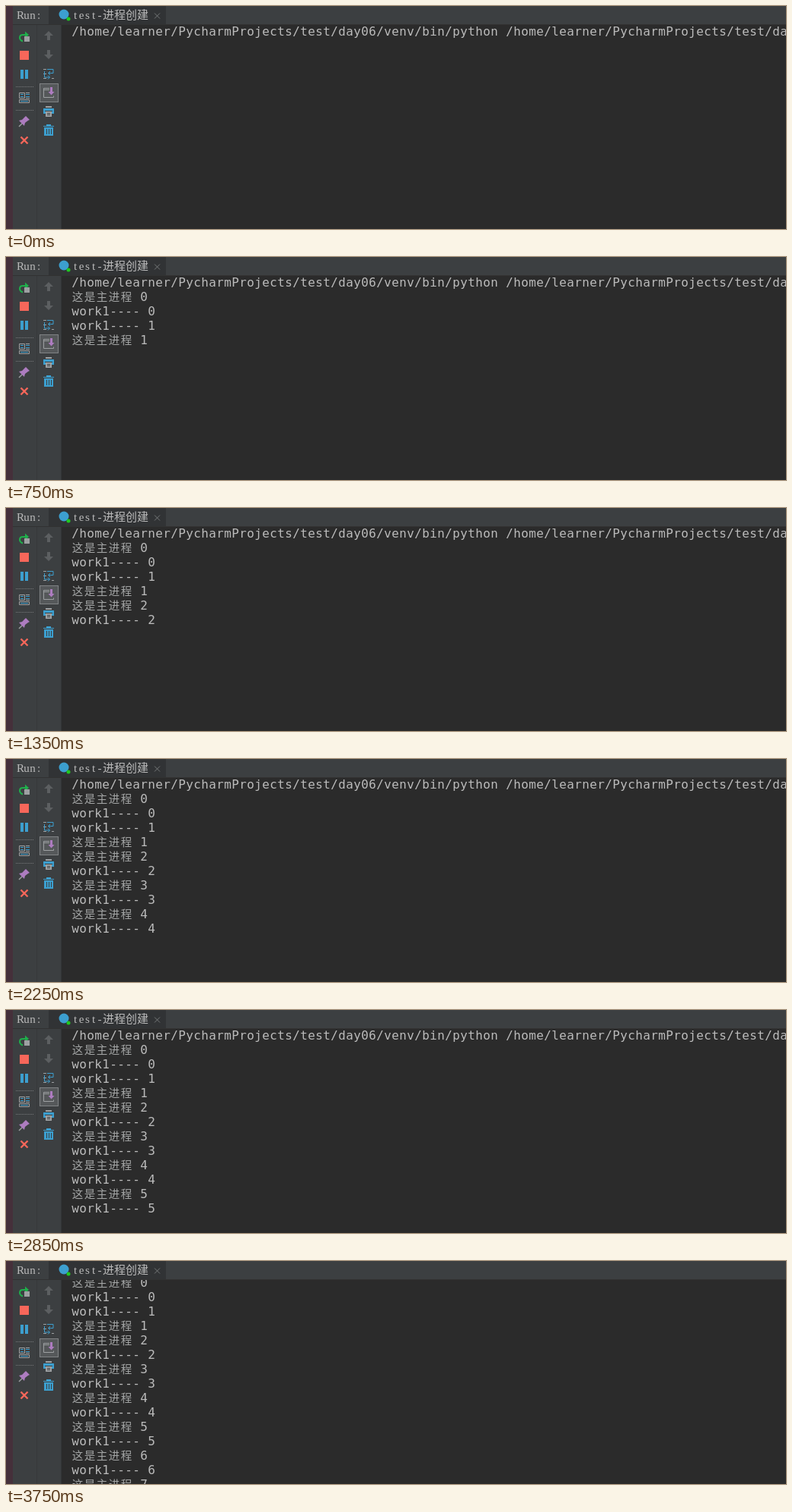
An HTML page with a canvas for the animation above (3.85 s loop, 1024 by 294 pixels).

```html
<!DOCTYPE html>
<html lang="zh">
<head>
<meta charset="utf-8">
<title>Run console</title>
<style>
  html, body { margin: 0; width: 100%; height: 100%; overflow: hidden; background: #2b2b2b; }
  canvas { display: block; }
</style>
</head>
<body>
<canvas id="stage" width="1024" height="294"></canvas>
<script>
const ctx = document.getElementById("stage").getContext("2d");
const LOOP = 3850, LINE_HEIGHT = 19;
const STEPS = [300, 750, 1350, 1800, 2250, 2850, 3290, 3750]; // two new lines at each
const PANEL = "#3c3f41", GREY = "#9da0a2", DIM = "#5c5f61";
const BLUE = "#3c9fcf", RED = "#f7675a", PURPLE = "#ad7cc0";
const CJK = "'Noto Sans CJK SC', 'Noto Sans CJK', sans-serif";
const CONSOLE = {
  font: "16px 'DejaVu Sans Mono', monospace", cell: 10,
  wideFont: "300 14.5px " + CJK, wideCell: 16, wideColor: "#a4a6a6"
};
const TAB = {
  font: "15px 'Liberation Serif', serif", cell: 8,
  wideFont: "300 15px " + CJK, wideCell: 15, wideColor: "#bbbbbb"
};

const path = "/home/learner/PycharmProjects/test/day06/venv/bin/";
const lines = [path + "python " + path.replace("venv/bin/", "test.py")];
for (let i = 0; i < 8; i++) {
  const pair = ["这是主进程 " + i, "work1---- " + i];
  lines.push(...(i === 1 ? pair.reverse() : pair));
}

function rect(color, x, y, w, h) {
  ctx.fillStyle = color;
  ctx.fillRect(x, y, w, h);
}

function fill(color, d) {
  ctx.fillStyle = color;
  ctx.fill(new Path2D(d));
}

function stroke(color, d, width = 1) {
  ctx.strokeStyle = color;
  ctx.lineWidth = width;
  ctx.stroke(new Path2D(d));
}

function circle(color, x, y, r) {
  ctx.fillStyle = color;
  ctx.beginPath();
  ctx.arc(x, y, r, 0, 2 * Math.PI);
  ctx.fill();
}

// Each glyph is centred in its grid cell; CJK glyphs take a wider cell
function text(string, x, y, style) {
  ctx.textAlign = "center";
  for (const char of string) {
    if (x > 1024) break;
    const isWide = char > "\u2e80";
    const cell = isWide ? style.wideCell : style.cell;
    ctx.font = isWide ? style.wideFont : style.font;
    ctx.fillStyle = isWide ? style.wideColor : "#bbbbbb";
    ctx.fillText(char, x + cell / 2, y);
    x += cell;
  }
}

function drawConsole(time) {
  const done = STEPS.filter(step => time >= step).length;
  const scroll = done === STEPS.length ? 24 : 0;
  rect("#2b2b2b", 0, 0, 1024, 294);
  lines.slice(0, 1 + 2 * done).forEach((line, i) =>
    text(line, 86, 39 + i * LINE_HEIGHT - scroll, CONSOLE));
}

function drawFrame() {
  rect(PANEL, 0, 0, 1024, 24);
  rect("#313335", 56, 0, 154, 24);
  rect("#323232", 9, 24, 1015, 1);
  rect(PANEL, 9, 25, 63, 269);
  rect("#37393b", 40, 25, 1, 269);
  rect("#323537", 72, 25, 1, 269);
  rect("#45303a", 0, 0, 9, 294);
  text("Run:", 15, 17, TAB);
  text("test-进程创建", 87, 17, TAB);
  circle(BLUE, 76, 11, 6.5);
  circle("#20c820", 82, 17, 2.5);
  stroke("#757879", "M195 9.5l7 7M202 9.5l-7 7");
}

function drawRunTools() {
  stroke("#1fae4b", "M22 46.5C16.5 44.5 17 38 22 38H26", 2);
  fill("#1fae4b", "M25 33.5l5 4.5l-5 4.5z");
  rect(GREY, 24, 40, 7, 7);
  rect(RED, 18, 59, 12, 12);
  rect(BLUE, 19, 84, 4, 12);
  rect(BLUE, 25, 84, 4, 12);
  for (let x = 13; x < 37; x += 2) {
    rect("#77797b", x, 106, 1, 1);
    rect("#77797b", x, 137, 1, 1);
  }

  stroke(GREY, "M17.5 114.5h7v7h-7zM26 114.5h5M26 121.5h5M17.5 123.5h13v4h-13z");
  stroke(BLUE, "M19 116.5h4M19 119.5h4M26 116.5h5M26 119.5h5M19 125.5h10");

  stroke(GREY, "M17 159l5-5", 1.5);
  fill(PURPLE, "M26 145l5 5l-2 1l-4 3l-1 4l-7-7l4-1l3-3z");
  stroke(RED, "M19.5 172.5l9 9M28.5 172.5l-9 9", 2.4);
}

function drawOutputTools() {
  fill(DIM, "M56 33l6 6h-4v6h-4v-6h-4z");
  fill(DIM, "M56 70l6-6h-4v-6h-4v6h-4z");

  stroke(GREY, "M49 83.5h4M49 89.5h4M49 95.5h4M60 95.5h3");
  stroke(BLUE, "M54 83.5h8v5h-6M58 86l-2.5 2.5l2.5 2.5M50.5 86v8h7M55 91.5l2.5 2.5l-2.5 2.5");

  rect("#808385", 44, 102, 25, 25);
  rect("#55585a", 45, 103, 23, 23);
  stroke(GREY, "M57 108.5h-7.5v12h13v-2M50 110.5h7");
  fill(PURPLE, "M58 107h3v6h2.5l-4 4.5l-4-4.5h2.5z");

  rect(GREY, 52, 132, 8, 2);
  rect(BLUE, 49, 135, 14, 7);
  rect(PANEL, 51, 138, 10, 1);
  rect(GREY, 52, 139, 8, 7);
  rect(PANEL, 54, 141, 4, 1);
  rect(PANEL, 54, 143, 4, 1);

  rect(BLUE, 49, 158, 14, 1);
  rect(BLUE, 53, 156, 6, 2);
  fill(BLUE, "M50 160h12v11h-12z");
  stroke(PANEL, "M53.5 162v7M56.5 162v7M59.5 162v7");
}

function draw(now) {
  drawConsole(now % LOOP);
  drawFrame();
  drawRunTools();
  drawOutputTools();
  requestAnimationFrame(draw);
}

draw(performance.now());
</script>
</body>
</html>
```
